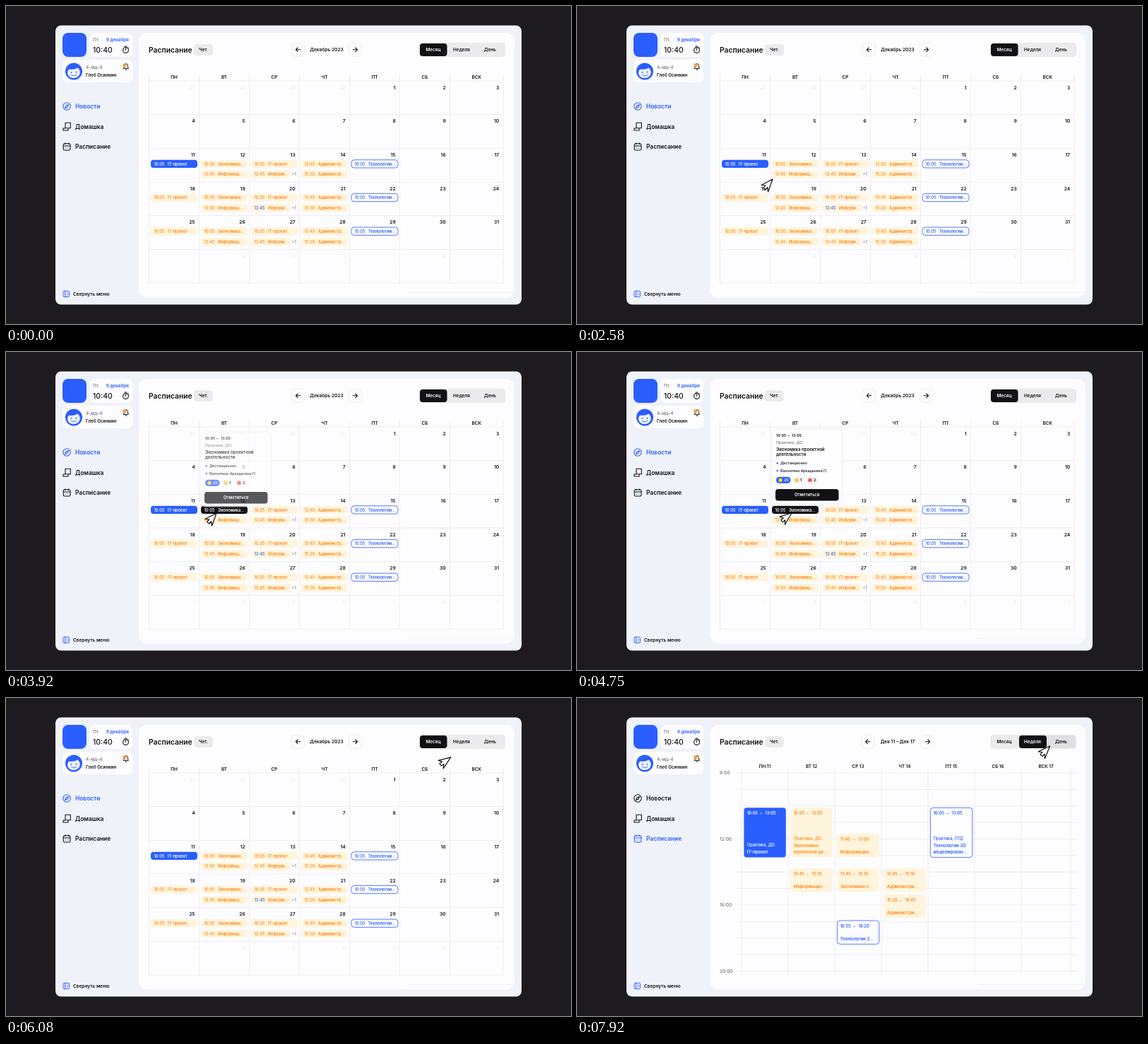
Animation, 800 px wide and 450 px high, one loop 8000 ms. Source, as an HTML page:

```html
<!DOCTYPE html>
<html lang="ru">
<head>
<meta charset="utf-8">
<title>Расписание</title>
<style>
html, body { margin: 0; width: 100%; height: 100%; overflow: hidden; background: #1d1b1f; }
svg { display: block; width: 100%; height: 100%; }
text { font-family: Inter, "Open Sans", sans-serif; white-space: pre; }
</style>
</head>
<body>
<svg id="stage" viewBox="0 0 800 450"></svg>
<script>
const LOOP = 8000;
const INK = '#121114', BLUE = '#2a5eff', ORANGE = '#ff8419', CREAM = '#fff5dc';
const GRAY = '#77767c', LINE = '#ebeaf0', PAPER = '#fdfcff', FAINT = '#efeef2';

// Markup helpers; text is placed by its vertical middle.
const rect = (x, y, w, h, r, fill, extra = '') =>
  `<rect x="${x}" y="${y}" width="${w}" height="${h}" rx="${r}" fill="${fill}" ${extra}/>`;
const text = (x, y, str, size, fill = INK, weight = 600, anchor = 'start', extra = '') =>
  `<text x="${x}" y="${y + size * 0.36}" font-size="${size}" font-weight="${weight}" fill="${fill}" text-anchor="${anchor}" ${extra}>${str}</text>`;
const path = (d, stroke, width = 1, fill = 'none', extra = '') =>
  `<path d="${d}" stroke="${stroke}" stroke-width="${width}" fill="${fill}" stroke-linejoin="round" stroke-linecap="round" ${extra}/>`;
const dot = (x, y, r, fill, extra = '') => `<circle cx="${x}" cy="${y}" r="${r}" fill="${fill}" ${extra}/>`;
const group = (id, body, extra = '') => `<g id="${id}" ${extra}>${body}</g>`;

const STYLES = {
  solid: { fill: BLUE, ink: '#fff', border: 'none' },
  cream: { fill: CREAM, ink: ORANGE, border: 'none' },
  open: { fill: PAPER, ink: BLUE, border: BLUE }
};

function sidebar() {
  const current = 'stroke="currentColor" fill="none" stroke-width="1.1"';
  const nav = (id, y, label, icon) =>
    group(id, icon + text(98, y, label, 8.4, 'currentColor'), `color="${INK}"`);
  return rect(80, 38, 34, 34, 8, BLUE) +
    rect(118.5, 38, 61, 34, 8, PAPER) +
    text(123, 47.3, 'Пт.', 6.4, GRAY, 500) +
    text(174, 47.3, '9 декабря', 6.4, BLUE, 600, 'end') +
    text(123, 62, '10:40', 10.4, INK, 500) +
    dot(169.5, 62.5, 3.9, 'none', `stroke="${INK}" stroke-width="1.1"`) +
    path('M168 57H171M169.5 62.5V60.3M172.7 58.7L173.6 59.6', INK) +
    rect(80, 76, 99.5, 32, 8, PAPER) +
    dot(96, 92.5, 12, BLUE) +
    path('M87.2 96Q86.5 91.5 89.5 89.5Q97 90.5 101.5 87.5Q105 90 104.8 95Q103 102 96 102Q89 102 87.2 96Z', 'none', 0, '#edf1ff') +
    dot(92.5, 94, .9, BLUE) + dot(99.5, 93.5, .9, BLUE) +
    path('M92.5 97.5Q96.5 100.5 100 97', BLUE, .9) +
    text(113, 87, '4-мд-4', 6.5, GRAY, 500) +
    text(113, 97.3, 'Глеб Осинкин', 6.2) +
    path('M166.3 88.3H173.5L172.5 86.3V84.5Q172.3 81.7 169.9 81.7Q167.5 81.7 167.3 84.5V86.3ZM169 90H171', INK) +
    dot(167.7, 83.7, 2.5, '#ff9d2b') +
    nav('news', 142, 'Новости', dot(86, 142, 5.2, 'none', current) +
      `<path d="M88.3 139.7L87 143L83.7 144.3L85 141Z" ${current}/>`) +
    nav('homework', 170.5, 'Домашка', `<path d="M84 173H81V176H88V173M84 165.2H91.3V172.8H84Z" ${current}/>`) +
    nav('plan', 199, 'Расписание', rect(81.2, 194.8, 9.8, 9.2, 1.8, 'none', current) +
      `<path d="M83.8 193.5V196M88.4 193.5V196M81.2 198H91M84 201H85M87.5 201H88.5" ${current}/>`) +
    rect(81, 403.3, 8.4, 8.4, 1.2, 'none', `stroke="${BLUE}"`) +
    path('M83.7 403.5V411.5M87.5 406L86 407.5L87.5 409', BLUE) +
    text(95, 407.5, 'Свернуть меню', 6.5);
}

function header() {
  const button = (id, d) => group(id,
    rect(-9.2, -9.3, 18.4, 18.6, 5, PAPER, `stroke="${LINE}" stroke-width=".8"`) + path(d, INK, 1.1));
  return text(202, 62, 'Расписание', 10.3) +
    rect(266, 54, 27, 16, 4.5, '#ebeaed') + text(279.5, 62, 'Чет.', 6.4, INK, 600, 'middle') +
    button('prev', 'M3.2 0H-3M-.4 -2.8L-3.2 0L-.4 2.8') +
    button('next', 'M-3.2 0H3M.4 -2.8L3.2 0L.4 2.8') +
    text(454, 62, 'Декабрь 2023', 6.6, INK, 600, 'middle', 'id="monthName"') +
    text(454, 62, 'Дек 11 – Дек 17', 6.6, INK, 600, 'middle', 'id="weekName"') +
    rect(585, 51.8, 122, 20.4, 5, '#ebeaed') +
    rect(666, 53, 40, 18, 4, '#e0dfe2', 'id="dayTint"') +
    rect(586, 53, 38.5, 18, 4, INK, 'id="monthTab"') +
    rect(626, 53, 39, 18, 4, INK, 'id="weekTab"') +
    text(605, 62, 'Месяц', 6.4, INK, 600, 'middle', 'id="monthTabName"') +
    text(645, 62, 'Неделя', 6.4, INK, 600, 'middle', 'id="weekTabName"') +
    text(685.5, 62, 'День', 6.4, INK, 600, 'middle');
}

function chip(x, y, time, name, style, w = 66, id = '', timeInk = '') {
  const s = STYLES[style];
  return `<g ${id && `id="${id}"`} fill="${s.ink}">` +
    rect(x, y, w, 11.3, 4, s.fill, `stroke="${s.border}" stroke-width=".8"`) +
    text(x + 4.4, y + 5.8, time, 5.8, timeInk || 'inherit', 500) +
    text(x + 24, y + 5.8, name, 5.7, 'inherit', 600) + '</g>';
}

function month() {
  const colX = i => i < 7 ? 202.5 + 71 * i : 704;
  const rowY = i => 106 + 47.67 * i;
  let out = '';
  for (let i = 0; i < 8; i++) out += path(`M${colX(i)} 98V392`, LINE, .8);
  for (let i = 0; i < 7; i++) out += path(`M202.5 ${rowY(i)}H704`, LINE, .8);
  ['ПН', 'ВТ', 'СР', 'ЧТ', 'ПТ', 'СБ', 'ВСК'].forEach((d, i) =>
    out += text((colX(i) + colX(i + 1)) / 2, 100.8, d, 6.4, INK, 600, 'middle'));
  for (let i = 0; i < 42; i++) {
    const n = i - 3, row = Math.floor(i / 7);
    const label = n < 1 ? n + 30 : n > 31 ? n - 31 : n;
    out += text(colX(i % 7 + 1) - 5.8, rowY(row) + 9.2, label, 6.7, n < 1 || n > 31 ? FAINT : INK, 600, 'end');
  }
  const days = [
    [['10:05', 'IT-проект']],
    [['10:05', 'Экономика...'], ['13:45', 'Информац...']],
    [['10:05', 'IT-проект'], ['13:45', 'Информ...']],
    [['13:45', 'Администр...'], ['15:20', 'Администр...']],
    [['10:05', 'Технологии...']]
  ];
  for (let row = 2; row < 5; row++) days.forEach((list, col) => list.forEach(([time, name], k) => {
    const x = colX(col) + 2.5, y = rowY(row) + 17 + 14.8 * k - .6;
    const more = col === 2 && k === 1;
    const style = col === 4 ? 'open' : col === 0 && row === 2 ? 'solid' : 'cream';
    const id = row === 2 && col === 1 && k === 0 ? 'hot' : '';
    out += chip(x, y, time, name, style, more ? 56 : 66, id, more && row === 3 ? '#3d5ad6' : '');
    if (more) out += text(x + 57.7, y + 5.8, '+1', 5.6, GRAY, 500);
  }));
  return out;
}

function week() {
  const hourY = h => 106 + (h - 8) * 23.37;
  const colX = i => i < 7 ? 233 + 66 * i : 699;
  const clock = s => { const [h, m] = s.split(':'); return +h + m / 60; };
  let out = '';
  for (let i = 0; i < 8; i++) out += path(`M${colX(i)} 98V394`, LINE, .8);
  for (let h = 8; h <= 20; h++) {
    out += path(`M227 ${hourY(h)}H707`, LINE, .8);
    if (h % 4 === 0) out += text(202, hourY(h), h + ':00', 6.5, GRAY, 500);
  }
  ['ПН', 'ВТ', 'СР', 'ЧТ', 'ПТ', 'СБ', 'ВСК'].forEach((d, i) =>
    out += text((colX(i) + colX(i + 1)) / 2, 96.3, `${d} ${11 + i}`, 6.3, INK, 600, 'middle'));
  const lesson = (col, from, to, style, titles, kind) => {
    const s = STYLES[style], x = colX(col) + 3.4, tx = x + 4.3;
    const top = hourY(clock(from)) + .6, bottom = hourY(clock(to)) + .8;
    out += rect(x, top, 59.4, bottom - top, 4, s.fill, `stroke="${s.border}" stroke-width=".8"`);
    out += text(tx, top + 7.8, from, 5.7, s.ink) + text(tx + 18.4, top + 7.8, '–', 5.7, s.ink, 700) +
      text(tx + 25.8, top + 7.8, to, 5.7, s.ink);
    titles.forEach((t, i) => out += text(tx, bottom - 8 - 8.5 * (titles.length - 1 - i), t, 6.2, s.ink));
    if (kind) out += text(tx, bottom - 17.2 - 9 * (titles.length - 1), kind, 5.7, s.ink, 500);
  };
  lesson(0, '10:05', '13:05', 'solid', ['IT-проект'], 'Практика, ДО');
  lesson(1, '10:05', '13:05', 'cream', ['Экономика', 'проектной де...'], 'Практика, ДО');
  lesson(4, '10:05', '13:05', 'open', ['Технологии 3D', 'моделирован...'], 'Практика, ПТД');
  lesson(2, '11:40', '13:05', 'cream', ['Информацио...']);
  lesson(1, '13:45', '15:10', 'cream', ['Информацио...']);
  lesson(2, '13:45', '15:10', 'cream', ['Экономика п...']);
  lesson(3, '13:45', '15:10', 'cream', ['Администри...']);
  lesson(3, '15:20', '16:45', 'cream', ['Администри...']);
  lesson(2, '16:55', '18:20', 'open', ['Технологии 3...']);
  return out;
}

function popup() {
  const pill = (x, w, fill, face, n, ink) => rect(x, 176.8, w, 9, 4.5, fill) +
    dot(x + 6, 181.3, 2.8, face) + text(x + 11, 181.4, n, 5.4, ink);
  return rect(276, 109, 99.5, 106, 6, PAPER, `stroke="${LINE}" stroke-width=".8"`) +
    text(282, 118, '10:05', 5.3) + text(298, 118, '–', 5.3, INK, 700) + text(304, 118, '13:05', 5.3) +
    text(282, 128.4, 'Практика, ДО', 5.4, GRAY, 500) +
    text(282, 138, 'Экономика проектной', 6.1) +
    text(282, 145, 'деятельности', 6.1) +
    dot(283.7, 157.5, 1.2, BLUE) + text(288, 157.4, 'Дистанционно', 5.2, INK, 500) +
    dot(283.7, 168, 1.2, BLUE) + text(288, 168, 'Валентина Аркадьевна П.', 5.2, INK, 500) +
    pill(282, 20.5, BLUE, '#ffc93c', '20', '#fff') +
    pill(305, 16, '#f3f2f5', '#ffc93c', '1', INK) +
    pill(324, 18, '#f3f2f5', '#f0603a', '2', INK) +
    rect(281, 194, 89.5, 16.5, 4, INK) +
    text(325.7, 202.3, 'Отметиться', 5.9, '#fff', 600, 'middle');
}

const stage = document.getElementById('stage');
stage.innerHTML = rect(0, 0, 800, 450, 0, '#1d1b1f') +
  rect(70, 27.5, 660, 395, 8, '#f0f2fa') +
  sidebar() +
  rect(188, 38, 532, 374.5, 12, PAPER) +
  path('M568 405.3H720', '#efeef2', .8) +
  header() +
  group('week', week()) + group('month', month()) + group('popup', popup()) +
  group('cursor', `<path d="M0 0L-16 8.5L-10.3 9L-13.2 12.4L-10.2 15L-7.3 11.6L-6.5 18Z" fill="#fff" stroke="${INK}" stroke-width="1.2" stroke-linejoin="round"/>`);

const el = {};
stage.querySelectorAll('[id]').forEach(n => el[n.id] = n);

// Timing helpers
const span = (t, a, b) => Math.min(1, Math.max(0, (t - a) / (b - a)));
const sine = k => (1 - Math.cos(Math.PI * k)) / 2;
const easeOut = k => 1 - (1 - k) ** 3;
const lerp = (a, b, k) => a + (b - a) * k;
const rgb = hex => [1, 3, 5].map(i => parseInt(hex.slice(i, i + 2), 16));
const mix = (a, b, k) => { const q = rgb(b); return `rgb(${rgb(a).map((v, i) => Math.round(lerp(v, q[i], k)))})`; };
const show = (node, k) => node.setAttribute('opacity', k);

// Cursor legs: start, end, curve points, tilt while moving
const LEGS = [
  [27, 2076, [-20, 340], [128, 405], [277, 245], 21],
  [2590, 3320, [277, 245], [286, 234], [298, 228], 4],
  [4606, 6327, [298, 228], [473, 223], [647, 69], 21],
  [7600, 7950, [647, 69], [658, 67], [670, 68], 4]
];

function moveCursor(t) {
  const leg = LEGS.filter(l => t >= l[0]).pop() || LEGS[0];
  const [a, b, p, c, q, tilt] = leg;
  const k = span(t, a, b), s = sine(k);
  const at = i => (1 - s) ** 2 * p[i] + 2 * s * (1 - s) * c[i] + s * s * q[i];
  const turn = tilt * Math.sqrt(Math.max(0, Math.sin(Math.PI * k)));
  el.cursor.setAttribute('transform', `translate(${at(0)} ${at(1)}) rotate(${turn})`);
}

function draw(t) {
  moveCursor(t);

  const hover = span(t, 3380, 3520) - span(t, 4990, 5130);
  el.hot.setAttribute('fill', mix(ORANGE, '#ffffff', hover));
  el.hot.firstChild.setAttribute('fill', mix(CREAM, INK, hover));

  const card = easeOut(span(t, 3725, 4325)) - easeOut(span(t, 4990, 5490));
  show(el.popup, card);
  el.popup.setAttribute('transform', `translate(0 ${13 * (1 - card)})`);

  const swap = easeOut(span(t, 6740, 7400));
  for (const id of ['month', 'monthName', 'monthTab']) show(el[id], 1 - swap);
  for (const id of ['week', 'weekName', 'weekTab']) show(el[id], swap);
  el.monthTabName.setAttribute('fill', mix('#ffffff', INK, swap));
  el.weekTabName.setAttribute('fill', mix(INK, '#ffffff', swap));
  el.news.setAttribute('color', mix(BLUE, INK, swap));
  el.plan.setAttribute('color', mix(INK, BLUE, swap));
  el.prev.setAttribute('transform', `translate(${lerp(413.5, 411.8, swap)} 61.8)`);
  el.next.setAttribute('transform', `translate(${lerp(494.4, 496.5, swap)} 61.8)`);
  show(el.dayTint, span(t, 7720, 7880));
}

const begin = performance.now();
function tick() {
  draw((performance.now() - begin) % LOOP);
  requestAnimationFrame(tick);
}
tick();
</script>
</body>
</html>
```
